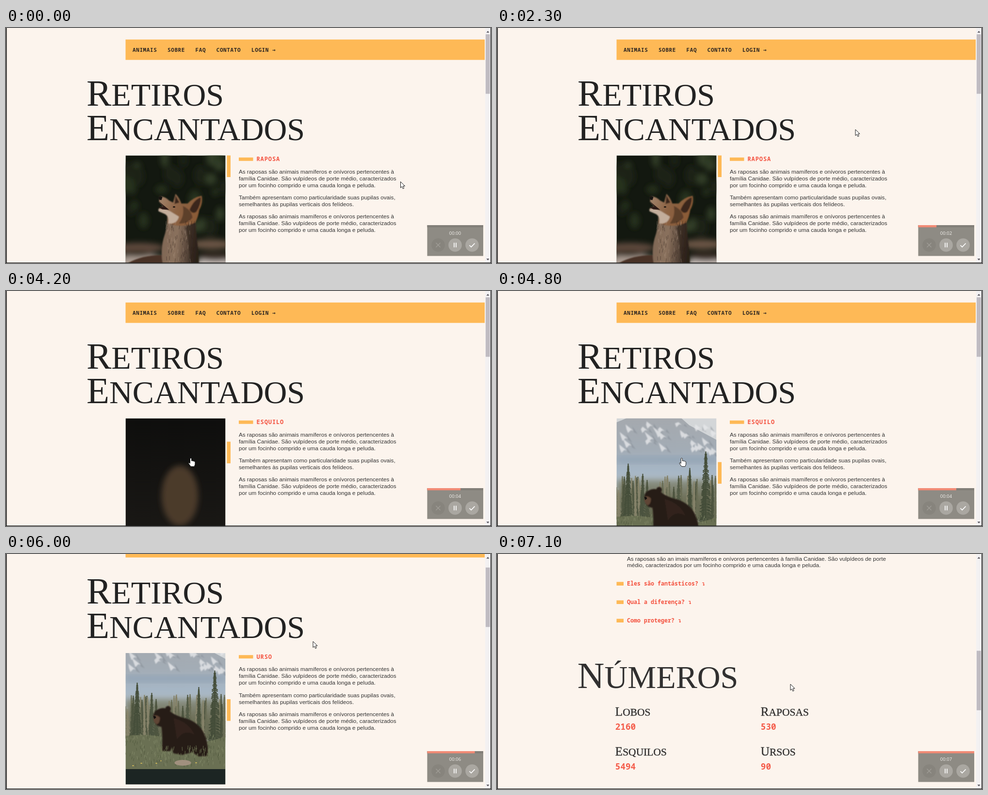
An HTML page that plays this animation: 1000x484 px, repeating every 7200 ms.

```html
<!DOCTYPE html>
<html lang="pt-BR">
<head>
<meta charset="utf-8">
<title>Retiros Encantados</title>
<style>
html, body { margin: 0; width: 100%; height: 100%; overflow: hidden; background: #fcf4ed; }
#stage { display: block; width: 1000px; height: 484px; }
text { white-space: pre; }
.serif { font-family: "Liberation Serif", "Noto Serif", serif; fill: #222; }
.sub { stroke: #222; stroke-width: .4px; }
.mono { font-family: "Noto Sans Mono", "DejaVu Sans Mono", monospace; font-weight: 700; }
.sign { font-family: "DejaVu Sans Mono", monospace; }
.nav { font-size: 11px; letter-spacing: .6px; fill: #2b2420; }
.tab { font-size: 12px; letter-spacing: .9px; }
.faq { font-size: 11.67px; }
.num { font-size: 17.6px; }
.red { fill: #f4523f; }
.body { font: 11.67px "Liberation Sans", Arial, sans-serif; fill: #333; }
.gold { fill: #feb956; }
.clock { font: 9.5px "Open Sans", sans-serif; fill: #f2f0ec; text-anchor: middle; }
</style>
</head>
<body>
<svg id="stage" viewBox="0 0 1000 484">
  <defs>
    <filter id="soft" x="-20%" y="-20%" width="140%" height="140%"><feGaussianBlur stdDeviation="6"/></filter>
    <filter id="fuzz" x="-10%" y="-10%" width="120%" height="120%"><feGaussianBlur stdDeviation="1"/></filter>
    <linearGradient id="fur" x1="0" y1="0" x2="1" y2=".2">
      <stop offset="0" stop-color="#7d6553"/><stop offset=".45" stop-color="#8a715d"/><stop offset="1" stop-color="#2c211b"/>
    </linearGradient>
    <linearGradient id="face" x1="0" y1="0" x2="1" y2=".3">
      <stop offset="0" stop-color="#a58770"/><stop offset=".5" stop-color="#8c6344"/><stop offset="1" stop-color="#8a5a36"/>
    </linearGradient>
    <linearGradient id="hill" x1="0" y1="0" x2="0" y2="1">
      <stop offset="0" stop-color="#a5a9ae"/><stop offset=".45" stop-color="#a3acb5"/><stop offset=".75" stop-color="#a6b6c5"/><stop offset="1" stop-color="#b4bfc6"/>
    </linearGradient>
    <linearGradient id="wood" x1="0" y1="0" x2="0" y2="1">
      <stop offset="0" stop-color="#8c9286"/><stop offset=".4" stop-color="#70725b"/><stop offset="1" stop-color="#5d6249"/>
    </linearGradient>
    <linearGradient id="night" x1="0" y1="0" x2="0" y2="1">
      <stop offset="0" stop-color="#0d0d0c"/><stop offset="1" stop-color="#1b1916"/>
    </linearGradient>
  </defs>
  <rect width="1000" height="484" fill="#fcf4ed"/>
  <g id="page">
    <rect class="gold" x="246.5" y="23.700" width="740.5" height="42"/>
    <g id="menu"></g>
    <g id="title"></g>
    <svg x="246.5" y="262.5" width="206" height="270.5">
      <g id="list">
        <g id="fox"></g>
        <g transform="translate(0 273)">
          <rect width="206" height="273" fill="url(#night)"/>
          <ellipse cx="112" cy="178" rx="38" ry="62" fill="#4b3a2c" filter="url(#soft)"/>
        </g>
        <g id="bear" transform="translate(0 546)"></g>
        <rect y="819" width="206" height="273" fill="#1c2523"/>
      </g>
    </svg>
    <rect id="thumb" class="gold" x="455.5" y="262.5" width="7.5" height="44.5"/>
    <rect class="gold" x="480" y="266.7" width="29.5" height="7"/>
    <text id="tab" class="mono tab red" x="516.5" y="274"></text>
    <g id="about"></g>
    <g id="faq"></g>
    <g id="stats"></g>
  </g>
  <rect x="988" width="11" height="484" fill="#f3f1f2"/>
  <path d="M990.5 9.5l3-3.5 3 3.5zM990.5 475l3 3.5 3-3.5z" fill="#55525a"/>
  <rect id="bar" x="989" y="13" width="9" height="122.5" fill="#c0bcc2"/>
  <path d="M0 0h1.5v483H1000v1H0zM999 0h1v484h-1z" fill="#151515"/>
  <g id="recorder">
    <rect x="868.5" y="406" width="115.5" height="63.5" fill="#8e8b84"/>
    <rect x="868.5" y="406" width="115.5" height="4.5" fill="#827f79"/>
    <rect id="progress" x="868.5" y="406" width="0" height="4.5" fill="#f28b76"/>
    <text id="clock" class="clock" x="926" y="425.5"></text>
    <circle cx="891" cy="447" r="13.8" fill="#87847d"/>
    <circle cx="926" cy="447" r="13.8" fill="#aaa7a1"/>
    <circle cx="961" cy="447" r="13.8" fill="#aaa7a1"/>
    <path d="M886.5 442.5l9 9m0-9l-9 9" stroke="#a19e98" stroke-width="1.3"/>
    <path d="M924 442.3v9.4m4-9.4v9.4M955.5 447.5l3.6 3.6 7.4-7.6" fill="none" stroke="#fff" stroke-width="1.7"/>
  </g>
  <g id="cursor">
    <path id="arrow" d="M0 0v12.6l2.9-2.7 2 4.6 2.3-1-2-4.5h3.9z" fill="#fff" stroke="#1a1a1a" stroke-width="1"/>
    <path id="hand" d="M-1.5 1q1.5-2 3 0v5q2.2-1.2 2.8.4 2-.8 2.6.6 2-.3 2 1.6v4.5l-1.7 4.4h-7.2l-4.5-6.3q-.4-2 1.8-1.2l1.2 1.2z" fill="#fff" stroke="#1a1a1a" stroke-width="1"/>
  </g>
</svg>
<script>
const LOOP = 7200, STEP = 100;
const el = id => document.getElementById(id);
const text = (cls, x, y, s) => `<text class="${cls}" x="${x}" y="${y}">${s}</text>`;
const sign = s => `<tspan class="sign">${s}</tspan>`;
const poly = (d, fill, more = "") => `<path d="${d}" fill="${fill}" ${more}/>`;
const blob = (x, y, rx, ry, fill) => `<ellipse cx="${x}" cy="${y}" rx="${rx}" ry="${ry}" fill="${fill}"/>`;

// Small capitals: a full first letter, lower capitals after it
const caps = (cls, x, y, size, s) =>
  `<text class="${cls}" x="${x}" y="${y}" font-size="${size * .86}">` +
  `<tspan font-size="${size}">${s[0]}</tspan>${s.slice(1).toUpperCase()}</text>`;

function random(seed) {
  return () => (seed = seed * 16807 % 2147483647) / 2147483647;
}

// Short random strokes inside a box
function strands(rnd, count, x, y, w, h, len) {
  let d = "";
  for (let i = 0; i < count; i++) {
    d += `M${(x + rnd() * w).toFixed(1)} ${(y + rnd() * h).toFixed(1)}l${(rnd() * 4 - 2).toFixed(1)} ${len}`;
  }
  return d;
}

function buildText() {
  const nav = [[261, "ANIMAIS"], [333, "SOBRE"], [390.5, "FAQ"], [433.7, "CONTATO"], [506, "LOGIN " + sign("→")]];
  el("menu").innerHTML = nav.map(([x, s]) => text("mono nav", x, 48.5, s)).join("");
  el("title").innerHTML = caps("serif", 166, 160, 77, "Retiros") + caps("serif", 166, 231, 77, "Encantados");

  const fox = [
    "As raposas são animais mamíferos e onívoros pertencentes à",
    "família Canidae. São vulpídeos de porte médio, caracterizados",
    "por um focinho comprido e uma cauda longa e peluda."
  ];
  const lines = [...fox, "Também apresentam como particularidade suas pupilas ovais,",
    "semelhantes às pupilas verticais dos felídeos.", ...fox];
  const ys = [299.5, 313.5, 327.5, 353, 367, 392, 406, 420];
  el("about").innerHTML = lines.map((s, i) => text("body", 480, ys[i], s)).join("");

  const asks = [[720, "O que são raposas?"], [796, "Eles são fantásticos?"],
    [834, "Qual a diferença?"], [872, "Como proteger?"]];
  el("faq").innerHTML = caps("serif", 168, 675, 77, "FAQ") +
    asks.map(([y, s]) => `<rect class="gold" x="246.5" y="${y - 3.5}" width="14.5" height="7.5"/>` +
      text("mono faq red", 268, y + 4, s + " " + sign("↴"))).join("") +
    text("body", 268, 748.7, "As raposas são an imais mamíferos e onívoros pertencentes à família Canidae. São vulpídeos de porte") +
    text("body", 268, 762.2, "médio, caracterizados por um focinho comprido e uma cauda longa e peluda.");

  const stats = [[246, 1068, "Lobos"], [546, 1068, "Raposas"], [246, 1150, "Esquilos"], [546, 1150, "Ursos"]];
  el("stats").innerHTML = caps("serif", 168, 1011, 77, "Números") +
    stats.map(([x, y, s]) => caps("serif sub", x, y, 25, s) + text("mono num red", x, y + 29, "0")).join("");
}

function buildFox() {
  const rnd = random(41);
  let back = "";
  for (let i = 0; i < 26; i++) {
    const tone = ["#25301f", "#1a2217", "#303d28"][i % 3];
    back += blob(rnd() * 206, rnd() * 150, 6 + rnd() * 9, 8 + rnd() * 14, tone);
  }
  back += blob(28, 190, 52, 10, "#5e4a3c") + blob(176, 183, 44, 10, "#6b5445") +
    blob(34, 228, 62, 24, "#aa9c93") + blob(182, 244, 52, 34, "#c9bfba") +
    blob(95, 268, 120, 14, "#9a8a80") + blob(186, 208, 40, 9, "#3a2f28") + blob(24, 202, 34, 6, "#33291f");
  el("fox").innerHTML = `<rect width="206" height="273" fill="#131810"/><g filter="url(#soft)">${back}</g>` +
    `<g filter="url(#fuzz)">` +
    poly("M82 206Q40 203 6 221Q0 232 16 231Q50 224 84 224z", "#4a3325") +
    poly("M92 232Q62 237 42 253Q36 270 52 268Q80 258 104 254z", "#593d2b") +
    poly("M86 126Q86 150 78 172Q70 205 80 236Q90 273 100 273H148Q153 232 150 198Q146 165 144 128z", "url(#fur)") +
    poly("M142 125Q146 165 150 198Q153 232 148 273H132Q136 200 124 150z", "#2a1f19", 'opacity=".55"') +
    poly("M70 85Q80 83 90 93L98 97L103 79Q111 87 115 99L128 99Q140 86 157 83Q160 98 152 112Q150 126 144 138Q112 152 86 138Q90 127 82 121L68 114Q66 108 78 105L69 95z", "url(#face)") +
    poly("M132 112Q140 92 155 86Q156 100 146 116Q138 122 132 112z", "#3a261a") +
    poly("M103 82l8 15-10 3z", "#3a281e") +
    poly("M68 110Q80 109 92 115L110 126Q106 142 88 140Q91 127 82 121L68 115z", "#c3ad9b") +
    poly("M118 104Q136 112 138 128Q128 142 110 140Q122 124 118 104z", "#4a3324", 'opacity=".7"') + `</g>` +
    poly("M68 86q3-4 8 0l-2 6-5-1z", "#171310") + poly("M69 95L90 112 76 111 68 107 78 105z", "#2c1a16") +
    blob(100, 106, 2.6, 1.5, "#1f150f") +
    `<path d="${strands(rnd, 60, 82, 132, 52, 125, 8)}" stroke="#c2ad98" stroke-width=".8" opacity=".4"/>` +
    `<path d="${strands(rnd, 60, 84, 132, 58, 125, 8)}" stroke="#2b201a" stroke-width=".9" opacity=".5"/>`;
}

// A thin conifer with ragged branches
function tree(rnd, x, top, base, half, fill) {
  let d = `M${x} ${top}V${base}`;
  for (let y = top + 4; y < base; y += 3) {
    const w = half * (.15 + .85 * (y - top) / (base - top)) * (.6 + rnd() * .6);
    d += `M${(x - w).toFixed(1)} ${y + 3}L${x} ${y}L${(x + w).toFixed(1)} ${y + 3}`;
  }
  return `<path d="${d}" fill="none" stroke="${fill}" stroke-width="2.2"/>`;
}

function buildBear() {
  const rnd = random(97);
  let woods = "", snow = "", rock = "";
  for (let i = 0; i < 46; i++) {
    woods += tree(rnd, Math.round(rnd() * 206), 118 + rnd() * 34, 208, 3 + rnd() * 4, ["#6a6d55", "#4d543f", "#858269"][i % 3]);
  }
  for (let i = 0; i < 26; i++) {
    const x = rnd() * 200, y = rnd() * 62, w = 6 + rnd() * 16;
    snow += `M${x} ${y}l${w} ${w * .8}l-5 -1l-6 6l-3 -8z`;
    rock += `M${x + 14} ${y + 4}l${w * .7} ${w}l-8 -4z`;
  }
  el("bear").innerHTML = `<rect width="206" height="273" fill="#d3d6d8"/>` +
    poly("M0 10L24 0H132L150 16 206 46V145H0z", "url(#hill)") +
    `<g filter="url(#fuzz)">` + poly(rock, "#858c95", 'opacity=".55"') +
    poly(snow, "#e6e8ea", 'opacity=".8"') + `</g>` +
    `<rect y="80" width="206" height="14" fill="#8b9fb2" opacity=".6" filter="url(#soft)"/>` +
    `<rect y="128" width="206" height="90" fill="url(#wood)" filter="url(#soft)"/>` + woods +
    tree(rnd, 24, 95, 212, 11, "#444d39") + tree(rnd, 54, 116, 208, 8, "#4b533f") +
    tree(rnd, 151, 104, 210, 8, "#454e39") + tree(rnd, 128, 120, 205, 7, "#525a45") +
    tree(rnd, 184, 70, 235, 15, "#434c38") +
    poly("M0 205Q50 198 100 212T206 206V273H0z", "#6a7053") +
    `<path d="${strands(rnd, 130, 0, 205, 206, 64, -6)}" stroke="#8b9270" stroke-width="1.2" opacity=".6"/>` +
    `<path d="${strands(rnd, 110, 0, 205, 206, 64, -6)}" stroke="#4c5439" stroke-width="1.2" opacity=".6"/>` +
    `<g filter="url(#fuzz)">` +
    poly("M57 166Q57 154 67 150Q75 146 82 148Q83 143 89 143Q96 146 92 154Q99 161 118 167Q150 174 162 200Q172 222 169 246L150 247 138 238 116 244 98 240 96 228 92 236H75Q77 206 74 186Q58 184 57 166z", "#281c17") +
    poly("M58 164Q64 160 71 167Q71 179 64 181Q56 176 58 164z", "#5f4535") +
    poly("M99 168Q130 176 142 202Q120 190 106 212z", "#3b2a22", 'opacity=".6"') + `</g>` +
    poly("M57 164q5-2 6 3l-4 3z", "#14100e") +
    `<path d="${strands(rnd, 50, 66, 232, 108, 18, -8)}" stroke="#747c58" stroke-width="1.2" opacity=".7"/>` +
    blob(118, 260, 17, 6, "#a1907e") +
    `<path d="M14 266h3m14-5h3m28 0h3m7-5h2m70 4h3" stroke="#d3ba58" stroke-width="2"/>`;
}

// Rows: time, then one or more values
function at(rows, t) {
  const i = rows.findIndex(r => r[0] > t);
  if (i < 0) return rows[rows.length - 1].slice(1);
  if (i === 0) return rows[0].slice(1);
  const [a, b] = [rows[i - 1], rows[i]];
  const p = (t - a[0]) / (b[0] - a[0]);
  return a.slice(1).map((v, k) => v + (b[k + 1] - v) * p);
}

const pointer = [
  [0, 813.5, 316.5], [300, 811, 312], [600, 788, 275], [900, 756, 226], [1200, 742, 210],
  [1500, 741, 209], [2300, 739, 209], [2500, 700, 219], [2700, 590, 253], [2900, 470, 293],
  [3100, 424, 310], [3300, 420.5, 311], [3700, 420.5, 311], [4000, 392, 335], [4200, 381, 344],
  [5200, 380.5, 344], [5400, 420, 315], [5600, 530, 243], [5800, 620, 188], [5900, 633, 180],
  [6200, 633, 180], [6600, 620, 220], [6900, 607, 262], [7100, 605, 268]
];
const listScroll = [[3300, 0], [3500, 102], [3700, 220], [3900, 292], [4400, 292], [4600, 430], [4800, 548], [4900, 580]];
const pageScroll = [[5900, 0], [6000, 58.5], [6100, 75], [6300, 165], [6500, 310], [6700, 485], [6900, 650], [7000, 712], [7100, 735]];
const totals = [2160, 530, 5494, 90];

function reveal(node, start, t) {
  const p = Math.min(1, Math.max(0, (t - start) / 300));
  const e = 1 - (1 - p) ** 2;
  node.setAttribute("opacity", e);
  node.setAttribute("transform", `translate(${-30 * (1 - e)} 0)`);
}

function draw(t) {
  const [x, y] = at(pointer, t), [list] = at(listScroll, t), [page] = at(pageScroll, t);
  const onPhoto = t >= 2900 && x < 452;
  el("cursor").setAttribute("transform", `translate(${x} ${y})`);
  el("arrow").setAttribute("visibility", onPhoto ? "hidden" : "visible");
  el("hand").setAttribute("visibility", onPhoto ? "visible" : "hidden");

  el("list").setAttribute("transform", `translate(0 ${-list})`);
  el("thumb").setAttribute("y", 262.5 + list * .164);
  el("page").setAttribute("transform", `translate(0 ${-page})`);
  el("bar").setAttribute("y", 13 + page * .2535);
  el("tab").textContent = t < 4200 ? "RAPOSA" : t < 5100 ? "ESQUILO" : "URSO";

  reveal(el("faq"), 6450, t);
  reveal(el("stats"), 6880, t);
  const part = Math.min(1, Math.max(0, (t - 6880) / 220));
  counters.forEach((n, i) => n.textContent = Math.floor(totals[i] * part));

  el("progress").setAttribute("width", Math.min(115.5, t * .01635));
  el("clock").textContent = "00:0" + Math.floor(t / 1000);
}

buildText();
buildFox();
buildBear();
const counters = document.querySelectorAll(".num");
const start = performance.now();
function tick() {
  const t = (performance.now() - start) % LOOP;
  draw(Math.floor(t / STEP) * STEP);
  requestAnimationFrame(tick);
}
tick();
</script>
</body>
</html>
```
